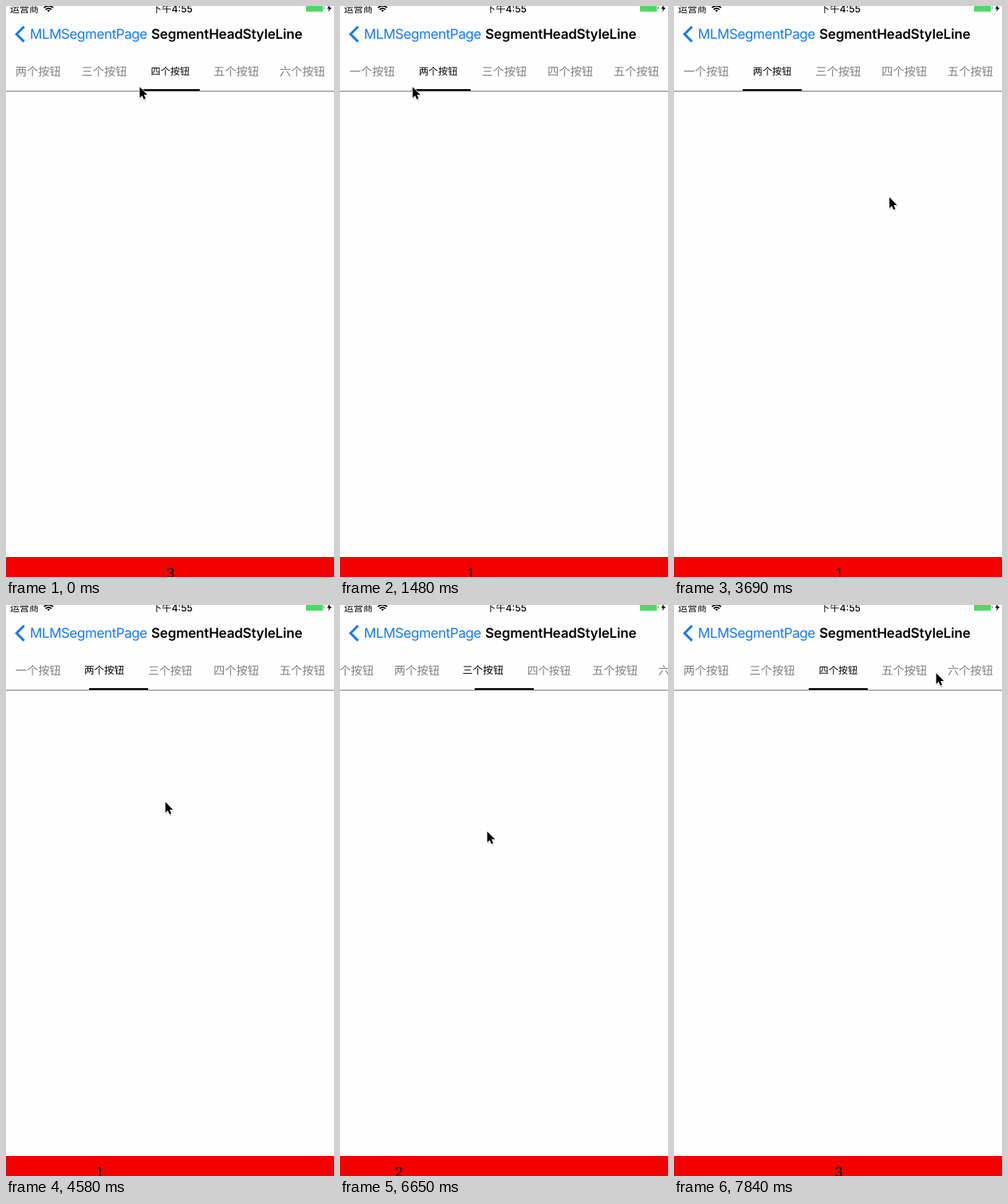
An HTML page for the animation above (7.99 s loop, 411 by 714 pixels).

```html
<!DOCTYPE html>
<html lang="zh-CN">
<head>
<meta charset="utf-8">
<title>Segment head</title>
<style>
  html, body { margin: 0; width: 100%; height: 100%; overflow: hidden; background: #fefefe; }
  svg { display: block; width: 100%; height: 100%; }
  text { font-family: Inter, "Noto Sans CJK SC", "Noto Sans CJK", sans-serif; text-rendering: geometricPrecision; }
  .tab { font-family: "Noto Sans CJK SC", "Noto Sans CJK", sans-serif; }
  .tab, .digit { text-anchor: middle; }
  .digit { font-size: 17px; }
</style>
</head>
<body>
<svg viewBox="0 0 411 714">
  <!-- status bar -->
  <text x="5" y="8" font-size="12">运营商</text>
  <g fill="none" stroke="#000" stroke-width="1.7">
    <path d="M47.5 2.2Q53.3 -2.6 59.1 2.2M49.7 4.5Q53.3 1.4 56.9 4.5"/>
    <path d="M51.6 5.5L53.3 7.4L55 5.5Q53.3 4.2 51.6 5.5Z" fill="#000" stroke="none"/>
  </g>
  <text x="208.5" y="8" font-size="12.2" font-weight="500" text-anchor="middle">下午4:55</text>
  <rect x="376" y="-3" width="21" height="10" fill="#4cd964"/>
  <path d="M398.4 0.5Q400 2 398.4 4.5Z"/>
  <path d="M406 -2L402.4 3.4H404.8L403.8 7.6L408 2H405.4Z"/>

  <!-- navigation bar -->
  <path d="M22.6 25.8L13.2 35.2L22.6 44.6" fill="none" stroke="#147afb" stroke-width="3"/>
  <text x="30" y="41" font-size="17" letter-spacing="-.42" fill="#147afb">MLMSegmentPage</text>
  <text x="182" y="41" font-size="17" font-weight="600" letter-spacing="-.2">SegmentHeadStyleLine</text>

  <g id="tabs"></g>
  <rect y="106" width="411" height="1" fill="#808080"/>
  <rect id="line" y="104" width="74" height="2"/>
  <rect y="689" width="411" height="25" fill="#f50000"/>
  <g id="digits"></g>

  <g id="cursor">
    <g transform="translate(-.5 -.8)">
      <path d="M0 1V15L3.2 12L5.4 17L8 16L6 11H10.3Z" opacity=".18" transform="translate(.4 1)"/>
      <path d="M0 0V13.6L3.1 10.8L5.2 15.6L7.5 14.6L5.4 9.9H9.6Z" stroke="#fff" stroke-width="1.6" paint-order="stroke"/>
    </g>
  </g>
</svg>
<script>
const LOOP = 7990, FRAMES = 54, STEP = LOOP / FRAMES;
const WIDTH = 411, TAB = 82.75, FIRST = 40.3;
const START_PAGE = 3, TAP_LEAD = 26, GLIDE = 1200;

const clamp = u => Math.min(1, Math.max(0, u));
const smooth = u => u * u * (3 - 2 * u);
const easeOut = u => 1 - (1 - u) ** 1.7;
const mix = (a, b, u) => a.map((v, i) => v + (b[i] - v) * u);

// The pointer goes from `from` to `to` while held; the page turns over `duration`.
const rest = (start, x, y) =>
  ({ start, from: [x, y], to: [x, y], hold: 0, turn: 0, duration: 1, ease: smooth });
const tap = (start, x) => ({ ...rest(start, x, 102), turn: -1, duration: 350, lead: TAP_LEAD });
const swipe = (start, from, to, hold, duration, ease) => ({ start, from, to, hold, turn: 1, duration, ease });
const flick = (start, x, y) => swipe(start, [x, y], [24, y + 4], 270, 1000, easeOut);

const gestures = [
  rest(0, 168, 102),
  tap(350, 138), tap(1200, 124), tap(1850, 42),
  flick(2665, 343, 224), flick(4452, 376, 245),
  swipe(5960, [375, 291], [24, 278], 1290, 1840, smooth),
  rest(7842, 329, 86)
];

// The head runs slightly ahead of the page after a tap.
function pageAt(time, useLead) {
  return gestures.reduce((page, { start, turn, duration, ease, lead = 0 }) => {
    const elapsed = time - start + (useLead ? lead : 0);
    return page + turn * ease(clamp(elapsed / duration));
  }, START_PAGE);
}

function pointerAt(time) {
  const i = gestures.findLastIndex(g => g.start <= time);
  const { start, from, to, hold } = gestures[i];
  const next = gestures[i + 1] ?? gestures[i];
  const sinceRelease = time - start - hold;
  if (sinceRelease < 0) return mix(from, to, (time - start) / hold);
  const glide = Math.min(GLIDE, next.start - start - hold) || 1;
  return mix(to, next.from, smooth(clamp(sinceRelease / glide)));
}

function addText(parent, className, content, y) {
  const el = document.createElementNS("http://www.w3.org/2000/svg", "text");
  el.setAttribute("class", className);
  el.setAttribute("y", y);
  el.textContent = content;
  return document.getElementById(parent).appendChild(el);
}

const line = document.getElementById("line");
const cursor = document.getElementById("cursor");
const tabs = [..."一两三四五六"].map(n => addText("tabs", "tab", n + "个按钮", 0));
const digits = [0, 1, 2, 3].map(n => addText("digits", "digit", n, 715));

function draw(time) {
  const page = pageAt(time, false);
  const head = pageAt(time, true);
  const scroll = Math.max(0, head - 2);

  tabs.forEach((tab, i) => {
    const size = 14.3 - 2.2 * clamp(1 - Math.abs(head - i));
    tab.setAttribute("x", FIRST + (i - scroll) * TAB);
    tab.setAttribute("y", 81.5 + size * .375);
    tab.setAttribute("font-size", size);
    tab.setAttribute("fill", Math.round(head) === i ? "#000" : "#808080");
  });
  line.setAttribute("x", FIRST + (head - scroll) * TAB - 37);
  digits.forEach((digit, i) => digit.setAttribute("x", 206.3 + (i - page) * WIDTH));
  cursor.setAttribute("transform", `translate(${pointerAt(time)})`);
}

function tick(now) {
  // The screen refreshes in coarse, even steps.
  draw(Math.floor((now % LOOP) / STEP + .1) % FRAMES * STEP);
  requestAnimationFrame(tick);
}
draw(0);
requestAnimationFrame(tick);
</script>
</body>
</html>
```
